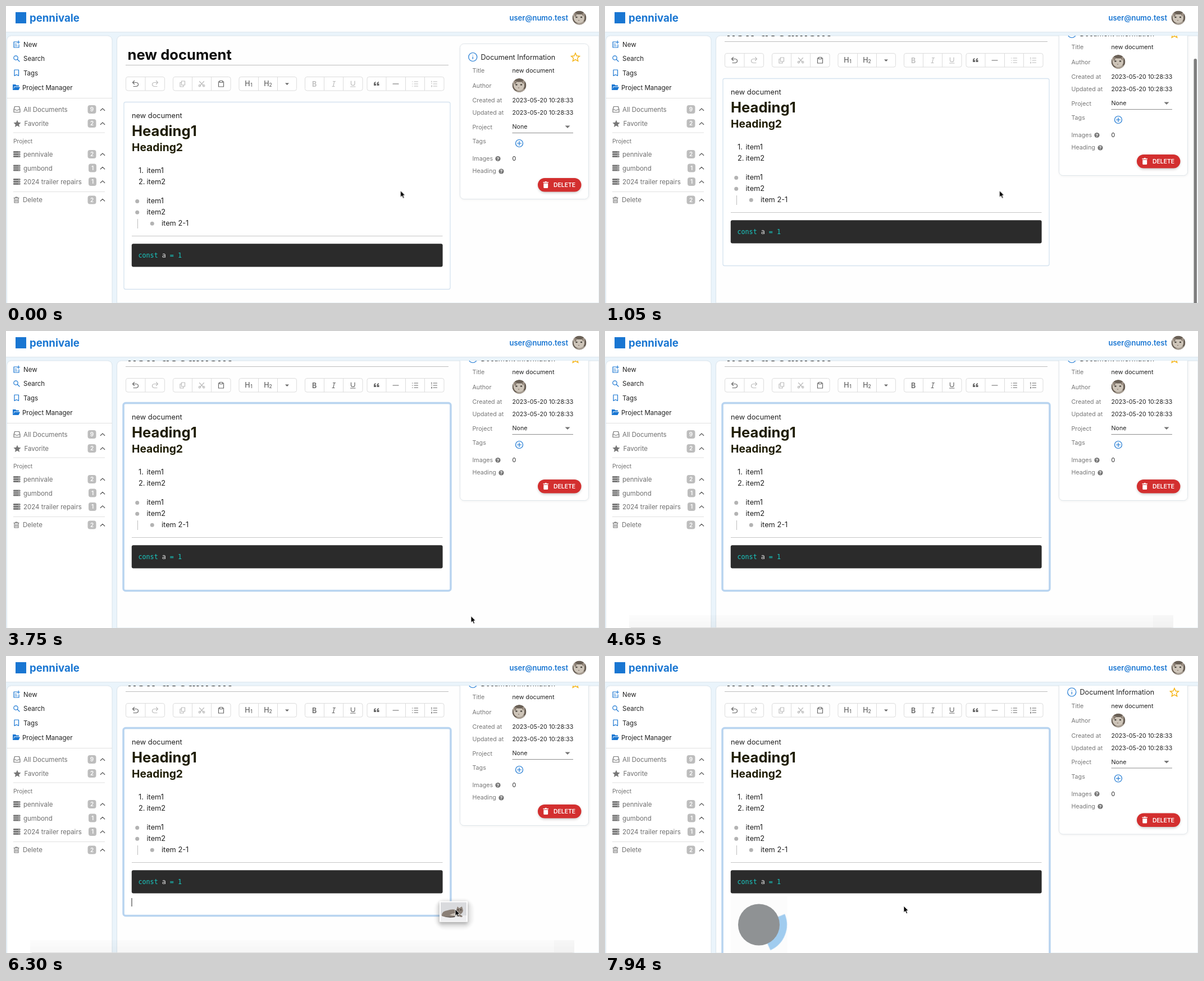
These frames come from a looping animation (1056x530 px, 8 s). An HTML page:

```html
<!DOCTYPE html>
<html lang="en">
<head>
<meta charset="utf-8">
<title>Note editor</title>
<style>
html, body { margin: 0; width: 100%; height: 100%; overflow: hidden; background: #eaf4fb; }
svg { display: block; }
#stage { width: 1056px; height: 530px; font: 11.5px Inter, "Noto Sans CJK TC", "Noto Sans CJK", sans-serif; fill: #222; }
.line { fill: none; stroke: currentColor; stroke-width: 1.2; stroke-linecap: round; stroke-linejoin: round; }
.solid { fill: currentColor; }
.blue { color: #1976d2; }
.gray { color: #777; fill: #6f6f6f; }
.small { font-size: 10.7px; }
.label { fill: #777; }
.badge text { fill: #fff; font-size: 10px; font-weight: 600; text-anchor: middle; }
.badge rect { fill: #bdbdbd; }
.rule { stroke: #e0e0e0; }
.box { fill: #fff; stroke: #dcdcdc; }
.on { color: #666; }
.off { color: #bcbcbc; }
.tool text { fill: currentColor; font-size: 12.5px; font-weight: 500; text-anchor: middle; }
.tool .sub { font-size: 8.5px; }
.body { font-size: 12.8px; }
.code { font: 11.7px "DejaVu Sans Mono", monospace; fill: #19c9c2; white-space: pre; }
.tag rect { fill: #626262; stroke: #424242; }
.tag text { fill: #f0f0f0; font-size: 10.5px; text-anchor: middle; }

/* every track shares one 8 s timeline */
.scroll { animation: scroll 8s linear infinite; }
.bar { animation: bar 8s linear infinite; }
.bar rect { animation: thumb 8s linear infinite; }
.panel { animation: panel 8s step-end infinite; }
.live { animation: live 8s step-end infinite; }
.ring { animation: ring 8s step-end infinite; }
.sheet { animation: sheet 8s step-end infinite; }
.caret { animation: caret 8s step-end infinite; }
.upload { animation: upload 8s step-end infinite; }
.spin { transform-origin: 274px 521.5px; animation: spin 8s linear infinite; }
.cursor { animation: cursor 8s linear infinite; }
.arrow { animation: arrow 8s step-end infinite; }
.beam { animation: beam 8s step-end infinite; }
.drag { animation: drag 8s step-end infinite; }
.dock { animation: dock 8s linear infinite; }
.stack { animation: stack 8s linear infinite; }
.stack > g { animation: fan 8s linear infinite; }
.tag { animation: tag 8s linear infinite; }
.shade { animation: shade 8s step-end infinite; }

@keyframes scroll {
  0%, 7.4% { transform: translateY(0); }
  7.5% { transform: translateY(-6px); }
  9.375% { transform: translateY(-23px); }
  11.25% { transform: translateY(-37px); }
  13.1%, 100% { transform: translateY(-42px); }
}
@keyframes thumb {
  0%, 7.4% { transform: translateY(-39px); }
  9.375% { transform: translateY(-18px); }
  11.25% { transform: translateY(-5px); }
  13.1%, 100% { transform: translateY(0); }
}
@keyframes bar {
  0%, 7.4% { opacity: 0; }
  7.5%, 20.5% { opacity: 1; }
  26.2%, 100% { opacity: 0; }
}
@keyframes panel { 0% { transform: none; } 89.875%, 100% { transform: translateY(15.5px); } }
@keyframes live { 0% { color: #bcbcbc; } 22.5%, 100% { color: #666; } }
@keyframes ring {
  0% { opacity: 0; height: 335px; }
  22.5% { opacity: 1; height: 335px; }
  89.875%, 100% { opacity: 1; height: 460px; }
}
@keyframes sheet { 0% { height: 334px; } 89.875%, 100% { height: 459px; } }
@keyframes caret {
  0%, 31.875%, 45%, 58.125%, 71.25%, 88%, 100% { opacity: 0; }
  22.5%, 37.5%, 50.625%, 63.75%, 76.875% { opacity: 1; }
}
@keyframes upload { 0% { opacity: 0; } 89.875%, 100% { opacity: 1; } }
@keyframes spin { 0%, 89.875% { transform: rotate(-429deg); } 100% { transform: rotate(57deg); } }
@keyframes cursor {
  0%, 14.9% { transform: translate(702.5px, 329.5px); }
  18.75%, 32.5% { transform: translate(698px, 443px); }
  37.5%, 44.5% { transform: translate(772px, 491px); }
  50.6%, 67% { transform: translate(915px, 536px); }
  73%, 75% { transform: translate(937.5px, 456px); }
  78.75%, 80.4% { transform: translate(800px, 452px); }
  85.5%, 100% { transform: translate(532px, 446px); }
}
@keyframes arrow { 0%, 35.6%, 100% { opacity: 1; } 16.875% { opacity: 0; } }
@keyframes beam { 0%, 35.6%, 100% { opacity: 0; } 16.875% { opacity: 1; } }
@keyframes drag { 0%, 88%, 100% { opacity: 0; } 75% { opacity: 1; } }
@keyframes dock { 0%, 54% { opacity: 0; } 57%, 87.9% { opacity: 1; } 90%, 100% { opacity: 0; } }
@keyframes stack { 0%, 59.9% { opacity: 0; } 60%, 76.5% { opacity: 1; } 78.7%, 100% { opacity: 0; } }
@keyframes fan {
  0%, 60% { transform: translateY(var(--dy)); animation-timing-function: ease-out; }
  65.5%, 100% { transform: none; }
}
@keyframes tag { 0%, 62.5% { opacity: 0; } 65.5%, 100% { opacity: 1; } }
@keyframes shade { 0%, 75%, 100% { opacity: 0; } 71.25% { opacity: .55; } }
</style>
</head>
<body>
<svg id="stage" viewBox="0 0 1056 530">
  <defs>
    <clipPath id="view"><path d="M197 530V61a8 8 0 0 1 8-8H1056V530z"/></clipPath>
    <clipPath id="round"><circle r="12.5"/></clipPath>
    <linearGradient id="fade" x2="0" y2="1">
      <stop offset="0" stop-opacity=".012"/><stop offset="1" stop-opacity=".035"/>
    </linearGradient>
    <filter id="soft" x="-30%" y="-50%" width="160%" height="200%"><feGaussianBlur stdDeviation="2.5"/></filter>
    <g id="avatar" clip-path="url(#round)">
      <circle r="12.5" fill="#6a6056"/>
      <path d="M-11-9L-3-6 4-6 9-10 9 2Q7 10 0 10-8 9-10 2z" fill="#cdc4b8"/>
      <path d="M-10-8L-4-6-8-1zM8-9L4-6 8-2z" fill="#8a7d72"/>
      <path d="M-13 13V8Q-3 13 9 6L13 13z" fill="#a79d92"/>
      <ellipse cx="-5" cy="-1" rx="1.7" ry="1.3" fill="#45413a"/><ellipse cx="3.5" cy="-1" rx="1.7" ry="1.3" fill="#45413a"/>
      <path d="M-2.500 4H.5L-1 5.500z" fill="#7f685e"/>
    </g>
    <g id="photo">
      <rect x="-26" y="-17" width="52" height="40" rx="5" opacity=".25" filter="url(#soft)"/>
      <rect x="-25" y="-18.500" width="50" height="37" fill="#fff"/>
      <rect x="-23" y="-16.500" width="46" height="33" fill="#d9dadd"/>
      <rect x="-23" y="7" width="46" height="9.500" fill="#eeeef0"/>
      <path d="M-21 6Q-20-1-11-2-3-5 5-3L7-9 10-6 15-9 17-2Q16 4 11 5L16 8 15 10 4 8Q-8 12-21 8z" fill="#8a7f76"/>
      <path d="M-7 6Q1 1 9 3L8 7Q0 9-7 6z" fill="#c9c1b8"/>
      <path d="M-20 8Q-8 11 3 8L2 10Q-10 12-20 8zM7-4H9V-2H7zM12-4H14V-2H12z" fill="#4c4540"/>
    </g>
    <path id="up" d="M-3.700 2L0-1.700 3.700 2" class="line" stroke-width="1.400"/>
    <g id="server" class="solid">
      <rect x="-6" y="-5.500" width="12.500" height="3.200" rx="1"/><rect x="-6" y="-1.600" width="12.500" height="3.200" rx="1"/><rect x="-6" y="2.300" width="12.500" height="3.200" rx="1"/>
      <path d="M3.500-3.900h1.200M3.500 0h1.200M3.500 3.900h1.200" stroke="#fff"/>
    </g>
    <path id="bin" class="line" d="M-4.500-3.500H4.500M-1.500-3.500V-5H1.500V-3.500M-3.500-3.500V5H3.500V-3.500M-1.200-1V3M1.200-1V3"/>
    <g id="help"><circle r="4.600" fill="#757575"/><text y="3" font-size="8" font-weight="700" text-anchor="middle" fill="#fff">?</text></g>
    <path id="star" d="M0-7.500L2.200-2.500 7.500-2 3.500 1.600 4.700 6.800 0 4.100-4.700 6.800-3.500 1.600-7.500-2-2.200-2.500z"/>
  </defs>

  <rect width="1056" height="530" fill="#eaf4fb"/>

  <!-- header -->
  <rect width="1056" height="46" fill="#fff"/>
  <path d="M0 46.500H1056" stroke="#dde6ed"/>
  <rect x="17" y="11" width="19" height="20" fill="#1976d2"/>
  <text x="42" y="27.500" font-size="18.600" font-weight="700" fill="#1976d2">pennivale</text>
  <text x="1001" y="26" font-size="13" font-weight="600" fill="#1976d2" text-anchor="end">user@numo.test</text>
  <use href="#avatar" x="1021" y="21"/>

  <!-- sidebar -->
  <path d="M1.500 530V61a8 8 0 0 1 8-8H181a8 8 0 0 1 8 8V530" fill="#fff" stroke="#d9e4ec"/>
  <g class="blue">
    <path class="line" d="M19 64H14V74H23V69M16 68H19M16 71H20M22 62V67M19.500 64.500H24.500"/>
    <circle class="line" cx="17.500" cy="92.500" r="3.700"/><path class="line" d="M20.500 95.500L24 99" stroke-width="1.700"/>
    <path class="line" d="M15 114H22.500V124.500L18.800 122.500 15 124.500z"/>
    <path class="solid" d="M12 150V140H17L18.500 141.500H23V143.500H14.500L13 149 15.200 144.500H25L22.500 150z"/>
  </g>
  <text x="31" y="72.500">New</text>
  <text x="31" y="98">Search</text>
  <text x="31" y="123.500">Tags</text>
  <text x="29" y="149.500">Project Manager</text>
  <path class="rule" d="M2 164.500H189M13 226H176M13 331.500H176"/>
  <g class="gray">
    <path class="line" d="M14 185L15.500 179.500H23.500L25 185V189.500H14V185H17.500Q19.500 188 21.500 185H25"/>
    <use href="#star" class="solid" transform="translate(20 210) scale(.88)"/>
    <use href="#server" x="19" y="264.500"/><use href="#server" x="19" y="289"/><use href="#server" x="19" y="313.500"/>
    <use href="#bin" x="18.500" y="346"/>
    <text x="31" y="189">All Documents</text>
    <text x="32.500" y="214">Favorite</text>
    <text x="13" y="244.500" font-size="10.300">Project</text>
    <text x="31" y="268.500">pennivale</text>
    <text x="31" y="293.500">gumbond</text>
    <text x="31" y="318">2024 trailer repairs</text>
    <text x="30" y="350">Delete</text>
  </g>
  <g class="badge" color="#555">
    <rect x="145.500" y="177" width="15" height="15" rx="4"/><text x="153" y="188.200">9</text><use href="#up" x="172" y="184.500"/>
    <rect x="145.500" y="202" width="15" height="15" rx="4"/><text x="153" y="213.200">2</text><use href="#up" x="172" y="209.500"/>
    <rect x="145.500" y="257" width="15" height="15" rx="4"/><text x="153" y="268.200">2</text><use href="#up" x="172" y="264.500"/>
    <rect x="147" y="281.500" width="14" height="15" rx="4"/><text x="154" y="292.700">1</text><use href="#up" x="172" y="289"/>
    <rect x="147" y="306" width="14" height="15" rx="4"/><text x="154" y="317.200">1</text><use href="#up" x="172" y="313.500"/>
    <rect x="145.500" y="338.500" width="15" height="15" rx="4"/><text x="153" y="349.700">2</text><use href="#up" x="172" y="346"/>
  </g>

  <!-- document -->
  <path d="M197.500 530V61a8 8 0 0 1 8-8H1056V530z" fill="#fefefe" stroke="#d9e4ec"/>
  <g clip-path="url(#view)">
    <g class="scroll">
      <text x="216.500" y="96" font-size="25.600" font-weight="700" fill="#0c0c0c">new document</text>
      <path d="M213 105.500H788" stroke="#bdbdbd"/>

      <g class="tool">
        <g class="box">
          <rect x="213.500" y="126.500" width="69" height="24.500" rx="3.500"/>
          <rect x="297.500" y="126.500" width="102.500" height="24.500" rx="3.500"/>
          <rect x="415" y="126.500" width="102.500" height="24.500" rx="3.500"/>
          <rect x="532.500" y="126.500" width="102.500" height="24.500" rx="3.500"/>
          <rect x="643" y="126.500" width="137" height="24.500" rx="3.500"/>
          <path d="M248 126.500v24.500M331.500 126.500v24.500M365.500 126.500v24.500M449.500 126.500v24.500M483.500 126.500v24.500M566.500 126.500v24.500M600.500 126.500v24.500M677 126.500v24.500M711.500 126.500v24.500M745.500 126.500v24.500"/>
        </g>
        <g class="on">
          <path class="line" d="M228.500 133.500L225.500 136.500 228.500 139.500M225.500 136.500H232Q235.500 137 235.500 140T232 143.500H227"/>
          <path class="line" d="M380 135H378.500V144H387.500V135H386M380.500 133.500H385.500V136.500H380.500z"/>
          <text x="430" y="143">H</text><text class="sub" x="437" y="143.500">1</text>
          <text x="464" y="143">H</text><text class="sub" x="471" y="143.500">2</text>
          <path class="solid" d="M497 137.500H504L500.500 141z"/>
          <path class="solid" d="M655 142V138.500Q655 135.500 658.500 135V136.500Q657 137 657 138.500H659V142zM660.500 142V138.500Q660.500 135.500 664 135V136.500Q662.500 137 662.500 138.500H664.500V142z"/>
          <path class="line" d="M689 139H699"/>
        </g>
        <g class="off">
          <path class="line" d="M267.500 133.500L270.500 136.500 267.500 139.500M270.500 136.500H264Q260.500 137 260.500 140T264 143.500H269"/>
          <path class="line" d="M312.500 134H318.500V141H312.500zM312.500 136.500H310V144H316V141"/>
          <path class="line" d="M344.500 134.500L351.500 142M352.500 134.500L345.500 142"/>
          <circle class="line" cx="344.800" cy="142.300" r="1.600"/><circle class="line" cx="352.200" cy="142.300" r="1.600"/>
        </g>
        <g class="live">
          <text x="549" y="143.500" style="font-weight:600">B</text>
          <path class="line" d="M582.500 134.500H586.500M581 143.500H585M584.700 134.500L582.800 143.500"/>
          <path class="line" d="M614.500 134V138.500Q614.500 141.500 617.800 141.500T621 138.500V134M613.500 144H622"/>
          <path class="line" d="M727 135H733.500M727 139H733.500M727 143H733.500M723.500 135H724M723.500 139H724M723.500 143H724"/>
          <path class="line" d="M761 135H767.500M761 139H767.500M761 143H767.500M757.800 134V136M757.500 138.500H758.200M757.500 142H758.200V144H757.500"/>
        </g>
      </g>

      <rect class="sheet" x="210" y="171.500" width="581" height="334" rx="3" fill="#fff" stroke="#d5e3f0" stroke-width="1.300"/>
      <rect class="ring" x="209" y="170.500" width="583" height="335" rx="4" fill="none" stroke="#b8d4f0" stroke-width="3.400"/>
      <g class="body">
        <text x="224" y="199.500">new document</text>
        <text x="224" y="231.500" font-size="25.600" font-weight="700" fill="#1f1d05">Heading1</text>
        <text x="224" y="258.500" font-size="19.300" font-weight="700" fill="#1f1d05">Heading2</text>
        <text x="236" y="298.300">1.</text><text x="250.500" y="298.300">item1</text>
        <text x="236" y="318.300">2.</text><text x="250.500" y="318.300">item2</text>
        <text x="250.500" y="351.800">item1</text>
        <text x="250.500" y="371.800">item2</text>
        <text x="277" y="391.800">item 2-1</text>
      </g>
      <g fill="#b3b3b3"><circle cx="233.700" cy="348.500" r="3.500"/><circle cx="233.700" cy="368.300" r="3.500"/><circle cx="260.300" cy="388.300" r="3.500"/></g>
      <path d="M234.500 380V397" stroke="#bdbdbd"/>
      <path d="M224 410.500H777.500" stroke="#c6c6c6"/>
      <rect x="223.800" y="424.200" width="553.800" height="41.200" rx="3" fill="#2b2b2b"/>
      <text class="code" x="235.500" y="449">const <tspan fill="#e6e6e6">a</tspan> = 1</text>
      <path class="caret" d="M224 474V489" stroke="#222"/>

      <g class="upload">
        <rect x="224" y="471" width="100.500" height="101" fill="#fcfcfc"/>
        <g class="spin">
          <circle cx="274" cy="521.500" r="43" fill="none" stroke="#a0ccef" stroke-width="14" pathLength="360" stroke-dasharray="88 272" transform="rotate(-44 274 521.500)"/>
        </g>
        <circle cx="274" cy="521.500" r="37" fill="#8f9294"/>
      </g>

      <!-- information card -->
      <g class="panel small">
        <rect x="809" y="69" width="229" height="276" rx="7" opacity=".08" filter="url(#soft)"/>
        <rect x="808.500" y="67.500" width="229" height="277" rx="7" fill="#fff" stroke="#dfe5ea"/>
        <g class="blue">
          <circle class="line" cx="831.300" cy="91" r="7.500" stroke-width="1.400"/>
          <path class="line" d="M831.300 90.500V94.500M831.300 87.500V87.700"/>
          <circle class="line" cx="914" cy="245" r="6.500"/><path class="line" d="M910.500 245H917.500M914 241.500V248.500"/>
        </g>
        <text x="845.500" y="95.500" font-size="12.600">Document Information</text>
        <use href="#star" x="1014" y="91.500" fill="none" stroke="#f5b312" stroke-width="1.400"/>
        <g class="label">
          <text x="830.500" y="119">Title</text>
          <text x="830.500" y="145.500">Author</text>
          <text x="830.500" y="172">Created at</text>
          <text x="830.500" y="194">Updated at</text>
          <text x="830.500" y="219.500">Project</text>
          <text x="830.500" y="245">Tags</text>
          <text x="830.500" y="276">Images</text>
          <text x="830.500" y="298.300">Heading</text>
        </g>
        <use href="#help" x="876" y="272.500"/><use href="#help" x="882" y="295"/>
        <text x="901.500" y="119">new document</text>
        <use href="#avatar" x="914" y="141.500"/>
        <text x="901.500" y="172">2023-05-20 10:28:33</text>
        <text x="901.500" y="194">2023-05-20 10:28:33</text>
        <text x="901.500" y="219">None</text>
        <path d="M995.500 213.500H1004.500L1000 218z" fill="#757575"/>
        <path d="M901.500 226.500H1010" stroke="#8c8c8c"/>
        <text x="901.500" y="276">0</text>
        <rect x="948" y="309" width="75.500" height="24" rx="12" opacity=".28" filter="url(#soft)"/>
        <rect x="947" y="307" width="77.500" height="24.500" rx="12.200" fill="#d32f2f"/>
        <path d="M956.500 314H959.500L960 313H962.500L963 314H966V315.500H956.500zM957.300 316.500H965.200V323.500Q965.200 325 964 325H958.500Q957.300 325 957.300 323.500z" fill="#fff"/>
        <text x="975" y="323" font-size="10.400" font-weight="600" fill="#fff">DELETE</text>
      </g>
    </g>
    <g class="bar"><rect x="1048.500" y="94" width="5.500" height="450" rx="2.700" fill="#7e7e7e"/></g>
  </g>

  <!-- dock and file stack -->
  <g class="dock">
    <rect x="43" y="507" width="969" height="23" fill="url(#fade)"/>
    <rect x="976" y="507" width="36" height="23" opacity=".015"/>
    <path d="M46 529.500H1009" stroke="#dcdcdc"/>
  </g>
  <g class="stack">
    <g style="--dy:30px">
      <use href="#photo" transform="translate(934 508) rotate(1)"/>
      <g class="tag"><g transform="translate(824 504.500) rotate(1.200)"><rect x="-78.500" y="-12" width="157" height="24" rx="4"/><text y="4">roughPlanUpdateCopy.jpeg</text></g></g>
    </g>
    <g style="--dy:84px">
      <rect x="911" y="466" width="50" height="20" rx="8" opacity=".22" filter="url(#soft)"/>
      <g transform="translate(936 454.500) rotate(3)"><use href="#photo"/><rect class="shade" x="-25" y="-18.500" width="50" height="37"/></g>
      <g class="tag"><g transform="translate(871 451.300) rotate(2.300)"><rect x="-34.500" y="-12" width="69" height="24" rx="4"/><text y="4">zub.jpeg</text></g></g>
    </g>
    <g style="--dy:138px">
      <circle cx="938" cy="400.500" r="24" fill="#919191" stroke="#3d3d3d" stroke-width="1.300"/>
      <path d="M927 412Q925 397 939 397V390L951 401 939 411V404.500Q930 404 927 412z" fill="#fff"/>
      <g class="tag"><g transform="translate(857 395.300) rotate(4)"><rect x="-51.500" y="-12" width="103" height="24" rx="4"/><text y="4" style="font-size:11px">在Pathly裡打開</text></g></g>
    </g>
  </g>

  <g class="cursor">
    <g class="drag">
      <rect x="-35" y="-17" width="66" height="51" rx="17" opacity=".08" filter="url(#soft)"/>
      <use href="#photo" x="-3" y="4"/>
    </g>
    <path class="arrow" d="M0 0V11.700L2.700 9.300 4.700 13.700 6.700 12.800 4.800 8.600H8.300z" fill="#000" stroke="#fff" stroke-width=".9"/>
    <path class="beam" d="M-3-6.500Q0-6.500 0-4.500 0-6.500 3-6.500M0-4.500V4.500M-3 6.500Q0 6.500 0 4.500 0 6.500 3 6.500M-1.500 1.500H1.500" fill="none" stroke="#222" stroke-width="1.200"/>
  </g>
</svg>
</body>
</html>
```
